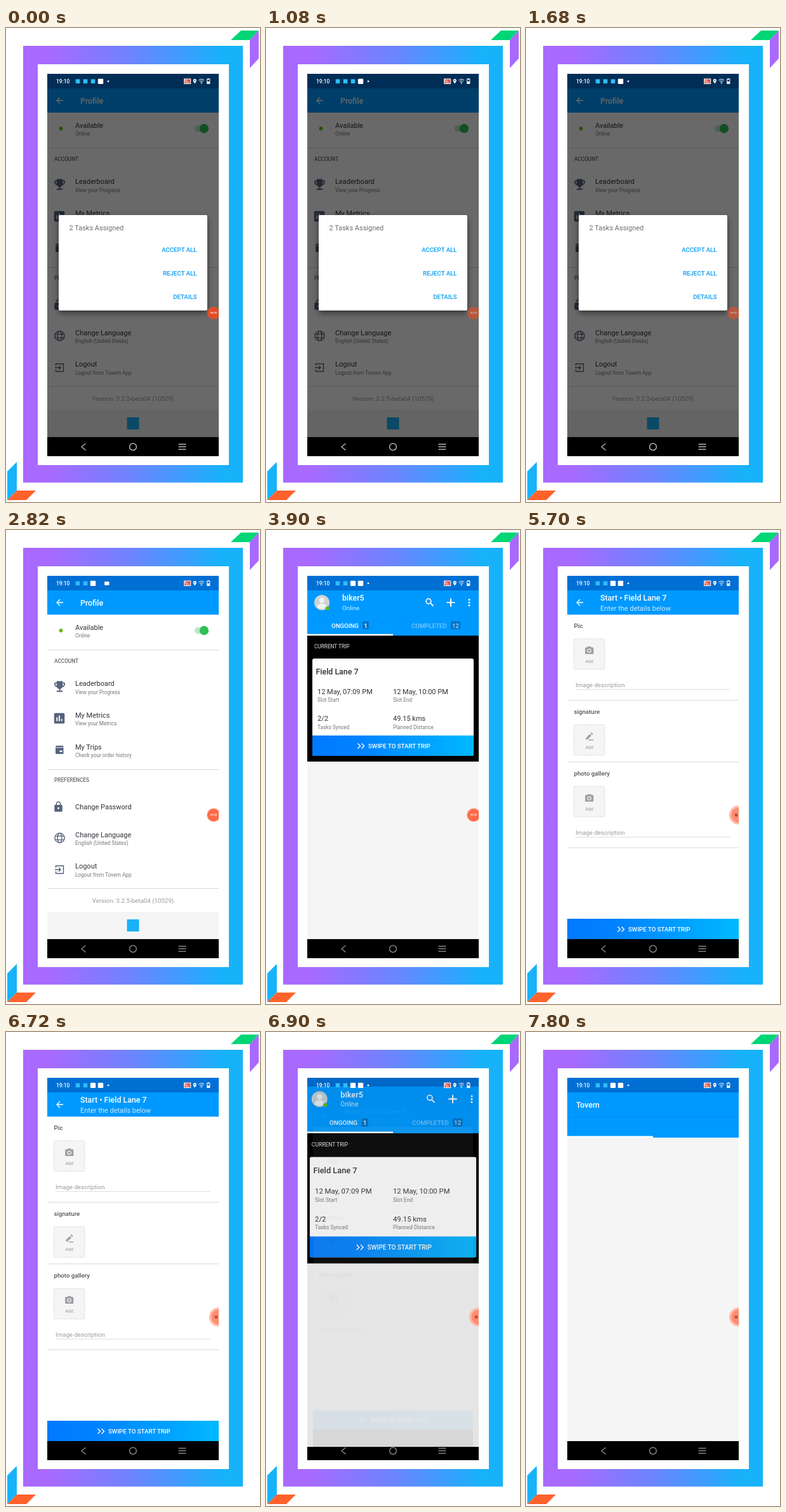
An HTML page that plays this animation: 400 px wide and 745 px high, repeating every 8000 ms.

```html
<!DOCTYPE html>
<html lang="en">
<head>
<meta charset="utf-8">
<title>Trip app walkthrough</title>
<style>
html, body { margin: 0; width: 100%; height: 100%; overflow: hidden; background: #fff; }
svg { display: block; width: 400px; height: 745px; font-family: Roboto, sans-serif; }
</style>
</head>
<body>
<svg id="stage" viewBox="0 0 400 745" xmlns="http://www.w3.org/2000/svg"></svg>
<script>
const LOOP = 8000, SHIFT = 460, CX = 200, CY = 372.5, NAV = 643;
const BLUE = '#0099ff', SLATE = '#56637c', INK = '#303238', SOFT = '#777', GREEN = '#67bd10';
const APP = 'Tovem', USER = 'biker5', TRIP = 'Field Lane 7';

// Drawing helpers
const text = (x, y, s, size, fill = INK, weight = 400, anchor = 'start') =>
  `<text x="${x}" y="${y}" font-size="${size}" fill="${fill}" font-weight="${weight}" text-anchor="${anchor}">${s}</text>`;
const rect = (x, y, w, h, fill, more = '') =>
  `<rect x="${x}" y="${y}" width="${w}" height="${h}" fill="${fill}" ${more}/>`;
const circle = (x, y, r, fill, more = '') =>
  `<circle cx="${x}" cy="${y}" r="${r}" fill="${fill}" ${more}/>`;
const line = (d, color, width, more = '') =>
  `<path d="${d}" fill="none" stroke="${color}" stroke-width="${width}" ${more}/>`;
const icon = (d, x, y, k, fill) =>
  `<path transform="translate(${x} ${y}) scale(${k}) translate(-12 -12)" d="${d}" fill="${fill}" fill-rule="evenodd"/>`;
const rule = y => rect(65, y, 270, 1, '#d9d9d9');
const group = (id, body, more = '') => `<g id="${id}" ${more}>${body}</g>`;

const ICON = {
  back: 'M20 11H7.83l5.59-5.59L12 4l-8 8 8 8 1.41-1.41L7.83 13H20z',
  cup: 'M19 5h-2V3H7v2H5c-1.1 0-2 .9-2 2v1c0 2.55 1.92 4.63 4.39 4.94.63 1.5 1.98 2.63 3.61 2.96V19H7v2h10v-2h-4v-3.1c1.63-.33 2.98-1.46 3.61-2.96C19.08 12.63 21 10.55 21 8V7c0-1.1-.9-2-2-2zM5 8V7h2v3.82C5.84 10.4 5 9.3 5 8zm14 0c0 1.3-.84 2.4-2 2.82V7h2z',
  chart: 'M19 3H5c-1.1 0-2 .9-2 2v14c0 1.1.9 2 2 2h14c1.1 0 2-.9 2-2V5c0-1.1-.9-2-2-2zM9 17H7v-7h2zm4 0h-2V7h2zm4 0h-2v-4h2z',
  lock: 'M18 8h-1V6c0-2.76-2.24-5-5-5S7 3.24 7 6v2H6c-1.1 0-2 .9-2 2v10c0 1.1.9 2 2 2h12c1.1 0 2-.9 2-2V10c0-1.1-.9-2-2-2zm-6 9c-1.1 0-2-.9-2-2s.9-2 2-2 2 .9 2 2-.9 2-2 2zm3.1-9H8.9V6c0-1.71 1.39-3.1 3.1-3.1s3.1 1.39 3.1 3.1z',
  camera: 'M9 2L7.17 4H4c-1.1 0-2 .9-2 2v12c0 1.1.9 2 2 2h16c1.1 0 2-.9 2-2V6c0-1.1-.9-2-2-2h-3.17L15 2zm3 15c-2.76 0-5-2.24-5-5s2.24-5 5-5 5 2.24 5 5-2.24 5-5 5zm0-2a3 3 0 100-6 3 3 0 000 6z',
  pen: 'M4 15.2V19h3.8L17 9.8 13.2 6zM18.7 8.1l1.6-1.6a1 1 0 000-1.4l-2.4-2.4a1 1 0 00-1.4 0l-1.6 1.6zM10 21h12v-2H12z',
  pin: 'M12 2C8.1 2 5 5.1 5 9c0 5.3 7 13 7 13s7-7.700 7-13c0-3.900-3.100-7-7-7zm0 9.500a2.500 2.500 0 110-5 2.500 2.500 0 010 5z'
};

const item = (y, title, sub) => text(109, y, title, 11) + (sub ? text(109, y + 12.6, sub, 8.25, SOFT) : '');
const shell = (bg, barEnd) =>
  rect(65, 72, 270, 572, bg) + rect(65, 72, 270, 23.5, '#006fd4') +
  rect(65, 95, 270, barEnd - 95, BLUE) + rect(65, NAV, 270, 31, '#000');
const backArrow = icon(ICON.back, 84.5, 114, .68, '#fff');
const swipe = (x, y, w, h) =>
  rect(x, y, w, h, 'url(#swipe)') +
  line(`M144.500 ${y + 12.500}l4 4-4 4m6-8l4 4-4 4`, '#fff', 1.4) +
  text(161, y + 20, 'SWIPE TO START TRIP', 9.7, '#fff', 500);

function profilePage() {
  const globe = circle(84.5, 484, 7.6, 'none', `stroke="${SLATE}" stroke-width="1.4"`) +
    `<ellipse cx="84.5" cy="484" rx="3.4" ry="7.600" fill="none" stroke="${SLATE}" stroke-width="1.3"/>` +
    line('M78 481.200h13M78 486.800h13', SLATE, 1.3);
  return shell('#fff', 133) + backArrow + text(117, 118.5, 'Profile', 12.4, '#fff', 500) +
    circle(86.5, 158, 2.9, GREEN) + item(156.6, 'Available', 'Online') +
    rect(297, 153, 20, 10, '#b9e8c6', 'rx="5"') + circle(312, 158, 7.2, '#2fc057') +
    rule(188) + text(76, 208.7, 'ACCOUNT', 8.25, '#666', 500) +
    icon(ICON.cup, 84.5, 246, .94, SLATE) + item(245, 'Leaderboard', 'View your Progress') +
    icon(ICON.chart, 84, 296, .92, SLATE) + item(294.8, 'My Metrics', 'View your Metrics') +
    rect(78, 339, 12.5, 13, SLATE, 'rx="1.5"') + rect(78, 341.4, 12.5, .9, '#fff') + rect(84.5, 346.5, 4, 2.5, '#fff') +
    item(344.6, 'My Trips', 'Check your order history') +
    rule(376) + text(76, 396.3, 'PREFERENCES', 8.25, '#666', 500) +
    icon(ICON.lock, 82.5, 435, .78, SLATE) + item(439, 'Change Password') +
    globe + item(482.6, 'Change Language', 'English (United States)') +
    line('M78.500 531v-3.300h12v12h-12v-3.300M77 533.700h9m-3-3l3 3-3 3', SLATE, 1.4) +
    item(532, 'Logout', `Logout from ${APP} App`) +
    rule(563) + text(200, 586, 'Version: 3.2.5-beta04 (10529)', 9.75, '#999', 400, 'middle') +
    rect(65, 600, 270, 43, '#f5f5f5') + rect(190.5, 612, 19, 19, '#19b1f8');
}

function homePage() {
  const fact = (x, y, value, label) => text(x, y, value, 11) + text(x, y + 12.2, label, 8.25, SOFT);
  const badge = (x, w, s, fill) => rect(x, 143.5, w, 12.5, '#0673c4') + text(x + w / 2, 153.5, s, 9.65, fill, 500, 'middle');
  return shell('#f5f5f5', 166) +
    circle(88, 114, 12, '#cfd2d4') + circle(88, 110.5, 4.2, '#f2f2f2') +
    `<path d="M80.500 121.500c0-8 15-8 15 0a12 12 0 01-15 0z" fill="#f2f2f2"/>` + circle(96.5, 123, 3, GREEN) +
    text(120, 111.4, USER, 12.4, '#fff', 500) + text(120, 125.5, 'Online', 9.7, '#d4edff') +
    circle(256, 112, 3.9, 'none', 'stroke="#fff" stroke-width="1.6"') + line('M259 115l4.500 4.500', '#fff', 1.8) +
    line('M284.500 114h13M291 107.500v13', '#fff', 2) +
    [109.5, 114, 118.5].map(y => circle(320, y, 1.5, '#fff')).join('') +
    text(103, 153.5, 'ONGOING', 9.65, '#fff', 500) + badge(152, 10, '1', '#fff') +
    text(229, 153.5, 'COMPLETED', 9.65, '#7cc6fb', 500) + badge(291, 15, '12', '#a5d6fb') +
    rect(65, 163.5, 135, 2.5, '#fff') +
    rect(65, 166, 270, 198, '#000') + text(76, 186, 'CURRENT TRIP', 8.25, '#e8e8e8') +
    `<g clip-path="url(#card)">` + rect(73, 202, 254, 153, '#fff') + swipe(73, 323, 254, 32) + '</g>' +
    text(78.5, 226.5, TRIP, 12.4, INK, 500) +
    fact(81, 258, '12 May, 07:09 PM', 'Slot Start') + fact(200, 258, '12 May, 10:00 PM', 'Slot End') +
    fact(81, 300.3, '2/2', 'Tasks Synced') + fact(200, 300.3, '49.15 kms', 'Planned Distance');
}

function startPage() {
  const add = (y, d) =>
    rect(75.5, y, 48.5, 48, '#f5f5f5', 'rx="2" stroke="#cbcbcb" stroke-width=".8" stroke-dasharray="2 1.500"') +
    icon(d, 99.7, y + 18.7, .66, '#9d9fa3') + text(99.7, y + 37.8, 'Add', 6.9, '#999', 400, 'middle');
  const field = y => text(78, y, 'Image description', 9.7, '#9b9b9b') + rect(78, y + 3.7, 244, 1, '#dcdcdc');
  const head = (y, s) => text(75.5, y, s, 9.7, '#555', 500);
  return shell('#fff', 133) + backArrow +
    text(117, 111.3, `Start • ${TRIP}`, 12.4, '#fff', 500) + text(117, 126.8, 'Enter the details below', 11, '#cfeaff') +
    head(154, 'Pic') + add(171, ICON.camera) + field(246.5) + rule(267) +
    head(289, 'signature') + add(306, ICON.pen) + rule(364) +
    head(386.2, 'photo gallery') + add(403, ICON.camera) + field(478.5) + rule(499) +
    swipe(65, 611, 270, 32);
}

const blankPage = () => shell('#f5f5f5', 166) + rect(65, 133, 270, 1, '#078eed') +
  rect(65, 163.5, 135, 2.5, '#fff') + text(79, 118.6, APP, 12.4, '#fff', 500);

function statusBar() {
  const tile = x => rect(x - 3.3, 80.5, 6.6, 6.6, '#2fbcff');
  const white = x => rect(x - 4.2, 79.7, 8.4, 8.2, '#fff', 'rx="1.2"');
  const dot = circle(161, 83.8, 1.4, '#fff');
  return text(79, 87, '19:10', 8.4, '#fff', 500) +
    group('note0', tile(113) + tile(125) + tile(137) + white(149) + dot) +
    group('note1', tile(113) + tile(125) + white(137) + rect(155, 81, 7.5, 5.8, '#fff', 'rx="1"')) +
    group('note2', tile(113) + tile(125) + white(137) + white(149) + dot) +
    rect(280.7, 80, 10, 7.6, '#e2574a', 'stroke="#fff" stroke-width="1"') +
    line('M281 83.500a4 4 0 014 4m-4-6a6 6 0 016 6', '#fff', .8) +
    icon(ICON.pin, 297.3, 83.7, .37, '#fff') +
    line('M303.500 82.200q4.300-3.600 8.600 0M305 84.100q2.800-2.300 5.600 0M306.500 86q1.300-1 2.600 0', '#fff', 1) +
    circle(307.8, 87, .8, '#fff') +
    rect(317.6, 79.2, 2.4, 1.2, '#fff') + rect(316.7, 80.4, 4.2, 7, 'none', 'stroke="#fff" stroke-width="1"') + rect(317, 84, 3.6, 3.4, '#fff');
}

const dialog = rect(83, 294, 234, 150, '#fff', 'rx="2" filter="url(#shadow)"') +
  text(99.5, 318.2, '2 Tasks Assigned', 11, '#6d6d6d') +
  ['ACCEPT ALL', 'REJECT ALL', 'DETAILS'].map((s, i) => text(300.5, 352.4 + i * 37, s, 9.65, '#079bf0', 500, 'end')).join('');

const stops = (...list) => list.map(([o, c]) => `<stop offset="${o}" stop-color="${c}"/>`).join('');
const stage = document.getElementById('stage');
stage.innerHTML = `<defs>
  <linearGradient id="frame">${stops([0, '#a969ff'], [.13, '#a76aff'], [.5, '#6c85ff'], [.72, '#3f9cff'], [.9, '#18b2fa'], [1, '#16b3f9'])}</linearGradient>
  <linearGradient id="swipe">${stops([0, '#0079ff'], [.3, '#0083ff'], [1, '#00b9ff'])}</linearGradient>
  <clipPath id="phone">${rect(65, 72, 270, 601, '#000')}</clipPath>
  <clipPath id="card">${rect(73, 202, 254, 153, '#000', 'rx="3"')}</clipPath>
  <clipPath id="navClip"><rect id="navRect" x="65" y="643" width="270" height="40"/></clipPath>
  <filter id="shadow" x="-20%" y="-20%" width="140%" height="150%"><feDropShadow dx="0" dy="4" stdDeviation="5" flood-opacity=".5"/></filter>
</defs>` +
  rect(0, 0, 400, 745, '#fff') + rect(27, 28, 346, 686.5, 'url(#frame)') + rect(50, 57, 301, 630, '#fff') +
  `<path d="M354 19l16-15h28l-14 15z" fill="#00d675"/><path d="M384 19l14-15v44l-14 15z" fill="#a969ff"/>
   <path d="M2 697l15-15v45l-15 15z" fill="#17b3f9"/><path d="M17 727h30l-15 15H2z" fill="#ff622b"/>` +
  `<g clip-path="url(#phone)">` + rect(65, 72, 270, 601, '#000') +
  group('home', homePage()) + rect(65, 72, 270, 601, '#000', 'id="dim"') +
  group('profile', profilePage()) + group('start', startPage()) + group('blank', blankPage()) +
  rect(65, 72, 270, 571, '#000', 'id="scrim"') +
  group('nav', line('M125.500 653l-6.500 5.300 6.500 5.300M271.500 654.300h12m-12 4h12m-12 4h12', 'currentColor', 1.4) +
    circle(200, 658.3, 5.4, 'none', 'stroke="currentColor" stroke-width="1.5"'), 'clip-path="url(#navClip)"') +
  statusBar() + group('dialog', dialog) +
  group('bubble', circle(0, 0, 1, '#ffb9a6', 'id="halo"') + circle(0, 0, 10, '#ff6b47', 'id="core"') +
    `<text id="clock" y="1.400" font-size="4" fill="#fff" font-weight="500" text-anchor="middle"></text>` +
    group('mark', circle(-4, 0, 1.8, 'none', 'stroke="#8c2d1c" stroke-width="1"') + circle(-4, 0, .7, '#8c2d1c'))) +
  '</g>';

const el = id => document.getElementById(id);
const set = (id, attrs) => { for (const k in attrs) el(id).setAttribute(k, attrs[k]); };
const clamp = v => Math.min(1, Math.max(0, v));
const span = (t, a, b) => clamp((t - a) / (b - a));
const mix = (a, b, p) => a + (b - a) * p;
const show = (id, on) => set(id, { visibility: on ? 'visible' : 'hidden' });

const pages = ['profile', 'home', 'start', 'blank'];
const moves = [
  { at: 3160, from: 'profile', to: 'home', back: true },
  { at: 4980, from: 'home', to: 'start' },
  { at: 6760, from: 'start', to: 'home', back: true },
  { at: 7320, from: 'home', to: 'blank' }
];

function place(id, scale, opacity) {
  show(id, true);
  set(id, { opacity, transform: `translate(${CX} ${CY}) scale(${scale}) translate(${-CX} ${-CY})` });
}

function drawPages(t) {
  pages.forEach(id => show(id, false));
  let dim = 0, navTop = NAV;
  const move = moves.filter(m => t >= m.at).pop();
  const q = move ? clamp((t - move.at) / SHIFT) : 1;
  if (q === 1) {
    place(move ? move.to : 'profile', 1, 1);
  } else {
    const p = 1 - (1 - q) ** 3;
    if (move.back) {
      const scale = mix(1.1, 1, p);
      place('home', scale, 1);
      place(move.from, mix(1, .9, p), 1 - span(q, .08, .32));
      dim = .2 * (1 - p);
      if (q > .2) navTop = CY + (NAV - CY) * scale;
    } else {
      place('home', mix(1, 1.15, p), 1);
      place(move.to, mix(.85, 1, p), span(q, .1, .25));
      dim = .2 * p;
    }
  }
  set('dim', { opacity: dim });
  set('navRect', { y: navTop });
}

function render(t) {
  drawPages(t);

  const shade = 1 - span(t, 1740, 2100), box = 1 - span(t, 1740, 1960);
  set('scrim', { opacity: .59 * shade });
  set('dialog', { opacity: box });
  set('nav', { color: shade > .5 ? '#b0b0b0' : '#808080' });

  const note = t < 2820 ? 0 : t < 3660 ? 1 : 2;
  for (let i = 0; i < 3; i++) show('note' + i, i === note);

  const dock = span(t, 4740, 5100);
  const fade = span(t, 60, 300) * shade;
  set('bubble', { transform: `translate(${mix(327, 335, dock)} 448)`, opacity: mix(1, .65, fade) });
  set('halo', { r: mix(11, 15, dock), opacity: mix(.8, 1, dock) * (1 - shade) });
  set('core', { r: mix(10, 11.5, dock), fill: dock > .5 ? '#ff8c70' : shade > .5 ? '#e04f28' : '#ff6b47' });
  const ticks = [1020, 2040, 3360, 4560].filter(s => t >= s).length;
  el('clock').textContent = '00:0' + (2 + ticks);
  set('clock', { opacity: 1 - dock });
  set('mark', { opacity: dock });
}

const began = performance.now();
function tick() {
  render((performance.now() - began) % LOOP);
  requestAnimationFrame(tick);
}
render(0);
requestAnimationFrame(tick);
</script>
</body>
</html>
```
